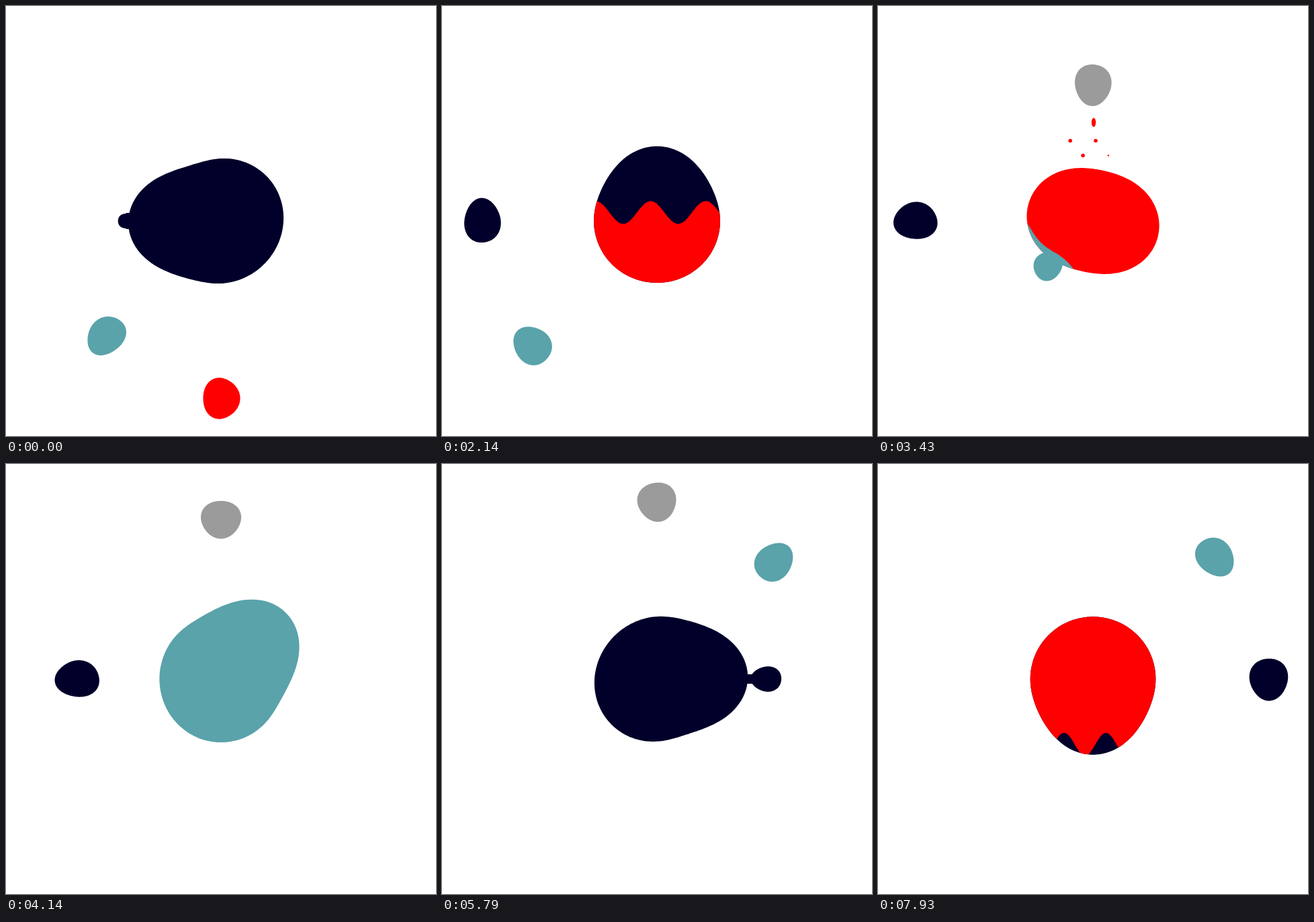
An HTML page with a canvas that plays this animation: 640 by 640 pixels, repeating every 8000 ms.

```html
<!DOCTYPE html>
<html lang="en">
<head>
<meta charset="utf-8">
<title>Drops</title>
<style>
  html, body { margin: 0; width: 100%; height: 100%; overflow: hidden; background: #fff; }
  canvas { display: block; width: 100vw; height: 100vh; }
</style>
</head>
<body>
<canvas width="640" height="640"></canvas>
<script>
const ctx = document.querySelector('canvas').getContext('2d');
const LOOP = 8000, CYCLE = 5650, TAU = 2 * Math.PI;
const BODY_RADIUS = 93, ORBIT = 264, NAVY = '#00002a';

// Each drop crosses the body along its own axis, once per cycle, back and forth.
// wobble: amount, radians per second and moment of the stretch along the axis
const red = {
  color: '#ff0000', angle: -TAU / 4, start: 0, lag: 0, size: 58,
  wobble: { amount: .065, rate: 5.95, peak: 3430 }, turn: -7,
};
const teal = {
  color: '#5aa3aa', angle: -TAU / 8, start: 1412, lag: 130, size: 57,
  wobble: { amount: -.1, rate: 3.98, peak: 3448 }, turn: -8,
};
const navy = {
  color: NAVY, angle: 0, start: 2790, lag: 0, size: 60,
  wobble: { amount: -.1, rate: 7.75, peak: 5000 }, turn: 11,
};
const drops = [red, teal, navy];

const ramp = (from, to, x) => Math.min(1, Math.max(0, (x - from) / (to - from)));
const smooth = (from, to, x) => { const k = ramp(from, to, x); return k * k * (3 - 2 * k); };

// Rules over u, the milliseconds since the drop's cycle began
const isIncoming = u => u < 2300;
const growth = u => smooth(2580, 3250, u);
const travel = u => isIncoming(u)
  ? 27 * (Math.max(0, u - 600) / 540) ** 1.9 - ORBIT
  : ORBIT - 61 * ((CYCLE - u) / 2220) ** 2.2 - 35 * (1 - growth(u));
const dropScale = u => isIncoming(u) ? 1 - .5 * ramp(1800, 2250, u) : growth(u);
const tail = u => 20 * smooth(2070, 2150, u) + 25 * smooth(2280, 2600, u) - 45 * smooth(2950, 3280, u);
const press = u => 10 * (smooth(1850, 2000, u) - smooth(2070, 2140, u));
const recoil = u => -.11 * smooth(3080, 3430, u)
  * Math.exp(-Math.max(0, u - 3430) / 900) * Math.cos((u - 3430) / 380);

function closedPath(radius) {
  const path = new Path2D(), steps = 150;
  for (let i = 0; i < steps; i++) {
    const a = i / steps * TAU, [rx, ry] = radius(a);
    path.lineTo(rx * Math.cos(a), ry * Math.sin(a));
  }
  path.closePath();
  return path;
}

function dropColor(drop, time) {
  if (drop !== red) return drop.color;
  const grey = smooth(3000, 3400, time) - smooth(7150, 7450, time);
  return `rgb(${255 - 100 * grey}, ${155 * grey}, ${155 * grey})`;
}

function inAxis(heading, paint) {
  ctx.save();
  ctx.rotate(heading);
  paint();
  ctx.restore();
}

function drawDrop({ drop, u, heading }, time) {
  const { amount, rate, peak } = drop.wobble;
  const age = isIncoming(u) ? u + CYCLE : u;
  const stretch = Math.exp(amount * Math.cos(rate * (age - peak) / 1000));
  const bulge = drop.turn * time / 1000 * TAU / 360 - heading;
  const x = travel(u), size = drop.size / 2 * dropScale(u);

  inAxis(heading, () => {
    ctx.fillStyle = dropColor(drop, time);
    const neck = 24 * (1 - ramp(2860, 3200, u));
    if (u > 2860) ctx.fillRect(0, -neck / 2, x, neck);
    ctx.translate(x, 0);
    ctx.fill(closedPath(a => {
      const r = size * (1 + .035 * Math.cos(3 * (a - bulge)));
      return [r * stretch, r / stretch];
    }));
  });
}

function drawSplash({ drop, u, heading }) {
  const age = u - 3150 - drop.lag;
  if (age <= 0) return;
  const reach = 1.05 * (1 - Math.exp(-age / 95));
  const speck = (x, y, rx, ry) => {
    ctx.beginPath();
    ctx.ellipse(x, y, rx, ry, 0, 0, TAU);
    ctx.fill();
  };
  inAxis(heading, () => {
    ctx.fillStyle = drop.color;
    const length = 8 * Math.sqrt(Math.max(0, 1 - age / 950));
    speck(144 * reach + .012 * age, 1, length, length * .47);
    for (let i = 0; i < 5; i++) {
      const life = 870 / (1 + i / 2);
      const r = Math.min(2.8, .018 * Math.max(0, life - age));
      speck((i % 2 ? 98 : 120) * reach, (19 * i - 34) * reach, r, r);
    }
  });
}

function bodyPath(states) {
  return closedPath(a => {
    let r = BODY_RADIUS;
    for (const { u, heading } of states) {
      const c = Math.cos(a - heading);
      r += tail(u) * Math.max(0, c) ** 3.5 - press(u) * c * c
        + BODY_RADIUS * recoil(u) * (2 * c * c - 1);
    }
    return [r, r];
  });
}

// Fill the body with the last colour that flooded it, then with the wave under way
function drawBody(body, states) {
  const sinceFlood = ({ u }) => (u - 2400 + CYCLE) % CYCLE;
  const latest = states.reduce((a, b) => sinceFlood(a) < sinceFlood(b) ? a : b);
  ctx.fillStyle = latest.drop.color;
  ctx.fill(body);

  for (const { drop, u, heading } of states) {
    if (u < 1960 || u > 2400) continue;
    const d = u - 2140;
    const front = 12 + .66 * d - .0004 * d * d;
    const swell = Math.min(17, Math.max(0, (u - 2000) * .2));
    const waveLength = 82 - .14 * d, crest = 72 + .457 * d;
    ctx.save();
    ctx.clip(body);
    ctx.rotate(heading);
    ctx.fillStyle = drop.color;
    ctx.beginPath();
    ctx.moveTo(-200, -200);
    for (let y = -200; y <= 200; y += 2) {
      ctx.lineTo(front + swell * Math.cos((y - crest) / waveLength * TAU), y);
    }
    ctx.lineTo(-200, 200);
    ctx.fill();
    ctx.restore();
  }
}

function draw(time) {
  ctx.setTransform(1, 0, 0, 1, 0, 0);
  ctx.fillStyle = '#fff';
  ctx.fillRect(0, 0, 640, 640);
  ctx.translate(320, 320);

  const states = drops.map(drop => {
    const cycle = Math.floor((time - drop.start) / CYCLE);
    return {
      drop,
      u: time - drop.start - cycle * CYCLE,
      heading: drop.angle + (cycle % 2 ? Math.PI : 0),
    };
  });
  const outgoing = states.filter(({ u }) => !isIncoming(u));
  const incoming = states.filter(({ u }) => isIncoming(u));

  outgoing.forEach(drawSplash);
  outgoing.forEach(state => drawDrop(state, time));
  drawBody(bodyPath(states), states);
  incoming.forEach(state => drawDrop(state, time));
}

function frame() {
  draw(performance.now() % LOOP);
  requestAnimationFrame(frame);
}
frame();
</script>
</body>
</html>
```
